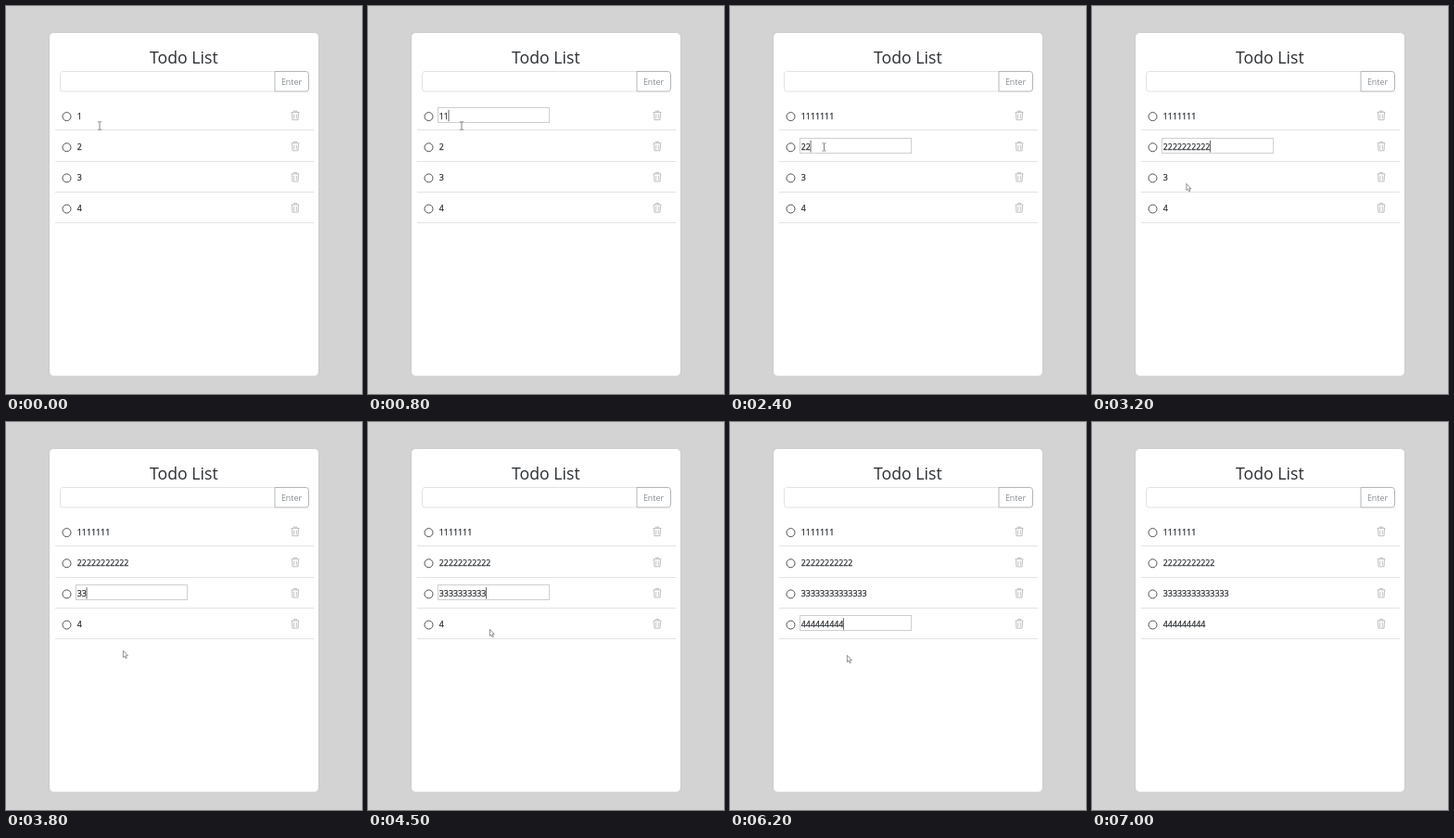
Recreate the animation shown at these times as an HTML page. Size 384 by 418 pixels, loop 8000 ms.

```html
<!DOCTYPE html>
<html lang="en">
<head>
<meta charset="utf-8">
<title>Todo List</title>
<style>
  html, body { margin: 0; width: 100%; height: 100%; overflow: hidden; background: #d3d3d3; }
  svg { display: block; width: 100%; height: 100%; }
  text { font-family: "Open Sans", "Noto Sans", sans-serif; fill: #2b2f33; }
  .title { font-size: 17.7px; text-anchor: middle; }
  .enter { font-size: 8.9px; text-anchor: middle; fill: #858b90; }
  .label { font-size: 8.85px; stroke: #2b2f33; stroke-width: .25px; }
  .line { fill: none; stroke: #e3e3e3; }
  .edit { fill: #fff; stroke: #cfcfcf; }
  .check { fill: none; stroke: #505050; }
  .trash { fill: none; stroke: #bebebe; }
</style>
</head>
<body>
<svg viewBox="0 0 384 418">
  <defs>
    <g id="trash" class="trash">
      <path d="M-4.5 -3.5H4.5M-1.7 -3.7V-5H1.7V-3.7"/>
      <path d="M-3.5 -3L-3 4.6H3L3.5 -3"/>
      <path d="M-1.3 -1.6V3.2M1.3 -1.6V3.2" stroke-width=".9"/>
    </g>
  </defs>
  <rect width="384" height="418" fill="#d3d3d3"/>
  <rect x="46.5" y="28.5" width="291" height="370.5" rx="5" fill="#fff" stroke="#cbcbcb"/>
  <text class="title" x="191.8" y="62">Todo List</text>
  <path class="line" d="M290 70.5H61.5Q58.5 70.5 58.5 73.5V89Q58.5 92 61.5 92H290"/>
  <path d="M290 70.5H323.5Q326.5 70.5 326.5 73.5V89Q326.5 92 323.5 92H290Z" fill="#fff" stroke="#b2b5b8"/>
  <text class="enter" x="308" y="85.4">Enter</text>
  <g id="rows"></g>
  <path id="ibeam" d="M-2 -4.2H-.6L0 -3.7L.6 -4.2H2M0 -3.7V3.7M-2 4.2H-.6L0 3.7L.6 4.2H2" fill="none" stroke="#777" stroke-width=".9"/>
  <path id="arrow" d="M.4 .4V7.6L2 6.2L3.2 8.8L4.4 8.2L3.2 5.7H5.4Z" fill="#fff" stroke="#777" stroke-width=".8"/>
</svg>
<script>
const LOOP = 8000, STEP = 100, PITCH = 33.15, DIGIT = 5.06;

// Per item: editing interval, blink gap, and [time, digit count] steps.
const items = [
  { open: 100, close: 2100, typed: [[0, 1], [800, 2], [1400, 3], [1500, 5], [1600, 7]] },
  { open: 2100, close: 3500, typed: [[0, 1], [2300, 2], [2600, 3], [2700, 4], [2800, 6], [2900, 7],
    [3000, 8], [3100, 9], [3200, 10], [3300, 11]] },
  { open: 3500, close: 4800, typed: [[0, 1], [3700, 2], [4000, 3], [4100, 4], [4200, 6], [4300, 7],
    [4400, 8], [4500, 10], [4600, 14]] },
  { open: 4800, close: 6300, blink: [5300, 5500], typed: [[0, 1], [5000, 2], [5500, 4], [5600, 6],
    [5700, 7], [5800, 8], [5900, 9]] }
];

// Pointer steps: time, shape, x, y.
const pointer = [
  [0, "ibeam", 101, 129], [1000, "ibeam", 100, 131], [1200, "arrow", 99, 130], [1300, "arrow", 99, 131],
  [1800, "arrow", 99, 139], [1900, "ibeam", 101, 148], [2300, "ibeam", 101.5, 152],
  [2800, "ibeam", 102, 158], [2900, "arrow", 102, 170], [3000, "arrow", 102, 184],
  [3100, "arrow", 102, 193], [3200, "arrow", 101.5, 191], [3400, "ibeam", 102, 187],
  [3700, "arrow", 113, 216], [3800, "arrow", 126, 246], [4300, "arrow", 128, 238],
  [4400, "arrow", 130, 228], [4500, "arrow", 131, 223], [4600, "ibeam", 138, 224],
  [6000, "ibeam", 136, 228], [6100, "arrow", 131, 240], [6200, "arrow", 126, 251],
  [6800, "arrow", 119, 180], [6900, "arrow", 105, 63], [7000, "none", 0, 0]
];

const byId = id => document.getElementById(id);
const latest = (steps, time) => steps.findLast(step => step[0] <= time);
const show = (node, visible) => node.setAttribute("visibility", visible ? "visible" : "hidden");
const snap = value => Math.floor(value) + .5;

function add(parent, tag, attributes) {
  const node = document.createElementNS("http://www.w3.org/2000/svg", tag);
  for (const name in attributes) node.setAttribute(name, attributes[name]);
  return parent.appendChild(node);
}

items.forEach((item, i) => {
  const y = 118.5 + i * PITCH;
  const row = add(byId("rows"), "g", {});
  add(row, "circle", { class: "check", cx: 65.5, cy: y + .6, r: 4.5 });
  add(row, "use", { href: "#trash", x: 312, y: y - .4 });
  add(row, "path", { class: "line", d: `M53 ${snap(y + 15.4)}H332` });
  item.box = add(row, "rect", { class: "edit", x: 75.5, y: snap(y - 9), width: 120, height: 16 });
  item.label = add(row, "text", { class: "label", x: 76.8, y: y + 3.3 });
  item.caret = add(row, "rect", { y: y - 6.7, width: 1, height: 12.5, fill: "#666" });
});

function render(time) {
  items.forEach((item, i) => {
    const count = latest(item.typed, time)[1];
    const editing = time >= item.open && time < item.close;
    const [off, on] = item.blink || [LOOP, LOOP];
    item.label.textContent = String(i + 1).repeat(count);
    item.caret.setAttribute("x", 76.4 + count * DIGIT);
    show(item.box, editing);
    show(item.caret, editing && !(time >= off && time < on));
  });
  const [, shape, x, y] = latest(pointer, time);
  for (const id of ["ibeam", "arrow"]) {
    show(byId(id), id === shape);
    byId(id).setAttribute("transform", `translate(${x} ${y})`);
  }
}

const start = performance.now();
function tick() {
  const time = (performance.now() - start) % LOOP;
  render(Math.floor(time / STEP) * STEP);
  requestAnimationFrame(tick);
}
tick();
</script>
</body>
</html>
```
